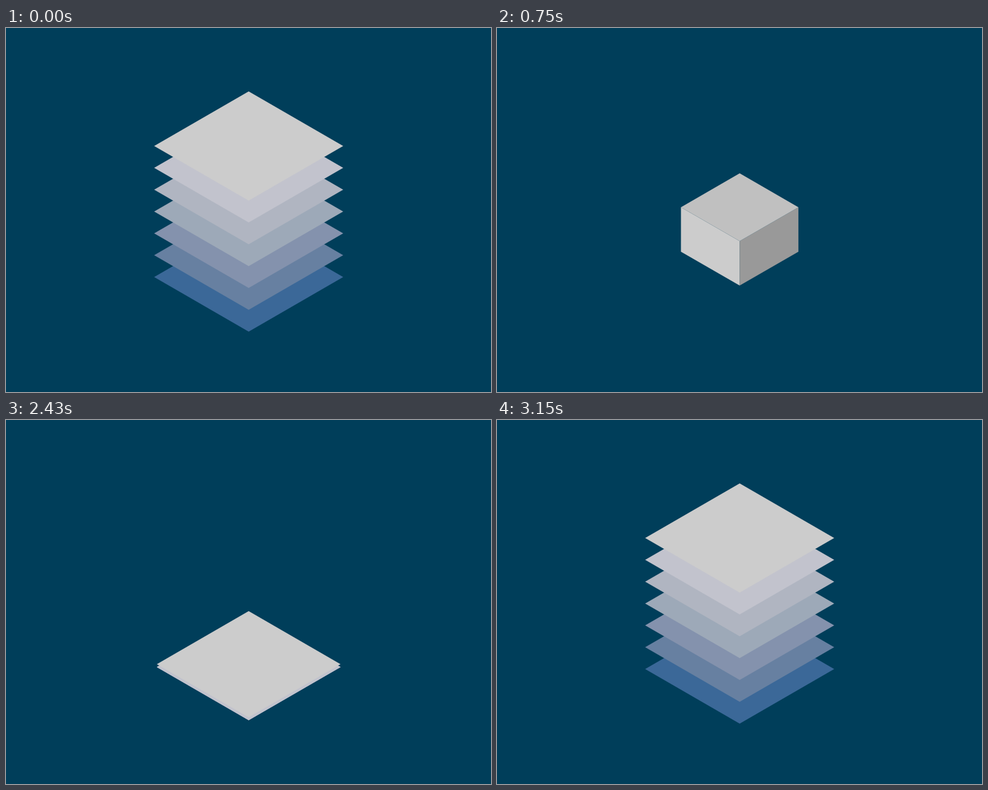
Animation of 800x600 px, one loop 3630 ms. Source, as an HTML page with a canvas:

```html
<!DOCTYPE html>
<html lang="en">
<head>
<meta charset="utf-8">
<title>Sheets and cube</title>
<style>
  html, body { margin: 0; height: 100%; overflow: hidden; background: #003e5a; }
  canvas { display: block; width: 800px; height: 600px; }
</style>
</head>
<body>
<canvas id="stage" width="800" height="600"></canvas>
<script>
const ctx = document.getElementById('stage').getContext('2d');

const LOOP = 3630, TICK = 30;
const HALF_W = 155.9, HALF_H = 90, SIDE = 180, GAP = 36;
const BASE = 110.5;      // base centre below the middle of the stage
const SMALL = 0.615;     // scale while the cube is shown
const CUBE_IN = 570, CUBE_OUT = 2400;

// Bottom to top; rank settles the order of sheets lying at one height.
const sheets = ['#3b6898', '#6780a1', '#8492ad', '#9da9b8', '#b0b5c1', '#c2c3cd', '#cccccc'];
const rank = [0, 1, 2, 4, 3, 5, 6];

const mix = (a, b, p) => a + (b - a) * p;
const span = (t, start, length) => Math.min(1, Math.max(0, (t - start) / length));
const sine = p => (1 - Math.cos(Math.PI * p)) / 2;

// cubic-bezier(.3, 0, 0, 1)
function swift(p) {
  if (p <= 0 || p >= 1) return p;
  let lo = 0, hi = 1;
  for (let i = 0; i < 24; i++) {
    const s = (lo + hi) / 2;
    if (0.9 * s * (1 - s) ** 2 + s ** 3 < p) lo = s; else hi = s;
  }
  return lo * lo * (3 - 2 * lo);
}

function poly(color, points) {
  ctx.fillStyle = color;
  ctx.beginPath();
  for (const [x, y] of points) ctx.lineTo(x, y);
  ctx.fill();
}

function diamond(color, y) {
  poly(color, [[0, y - HALF_H], [HALF_W, y], [0, y + HALF_H], [-HALF_W, y]]);
}

function lift(i, t) {
  const part = t < CUBE_IN
    ? 1 - sine(span(t, 52 + (i - 1) * 60, 201))
    : swift(span(t, 2400 + (6 - i) * 60, 440));
  return i * GAP * part;
}

function drawSheets(t) {
  sheets
    .map((color, i) => ({ color, z: lift(i, t), rank: rank[i] }))
    .sort((a, b) => a.z - b.z || a.rank - b.rank)
    .forEach(s => diamond(s.color, BASE - s.z));
}

function drawCube(t) {
  const rise = swift(span(t, 600, 490)) - swift(span(t, 2010, 440));
  const top = BASE - SIDE * rise;
  const grey = Math.round(mix(204, 185, rise));
  poly('#cccccc', [[-HALF_W, top], [0, top + HALF_H], [0, BASE + HALF_H], [-HALF_W, BASE]]);
  poly('#999999', [[HALF_W, top], [0, top + HALF_H], [0, BASE + HALF_H], [HALF_W, BASE]]);
  diamond(`rgb(${grey},${grey},${grey})`, top);
}

function draw(t) {
  const shrink = swift(span(t, 188, 710)) - swift(span(t, 2010, 700));
  const k = mix(1, SMALL, shrink);
  ctx.setTransform(1, 0, 0, 1, 0, 0);
  ctx.fillStyle = '#003e5a';
  ctx.fillRect(0, 0, 800, 600);
  ctx.setTransform(k, 0, 0, k, 400.3, 300);
  if (t >= CUBE_IN && t < CUBE_OUT) drawCube(t);
  else drawSheets(t);
}

const began = performance.now();
function frame() {
  const t = (performance.now() - began) % LOOP;
  draw(Math.floor(t / TICK) * TICK);
  requestAnimationFrame(frame);
}
frame();
</script>
</body>
</html>
```
